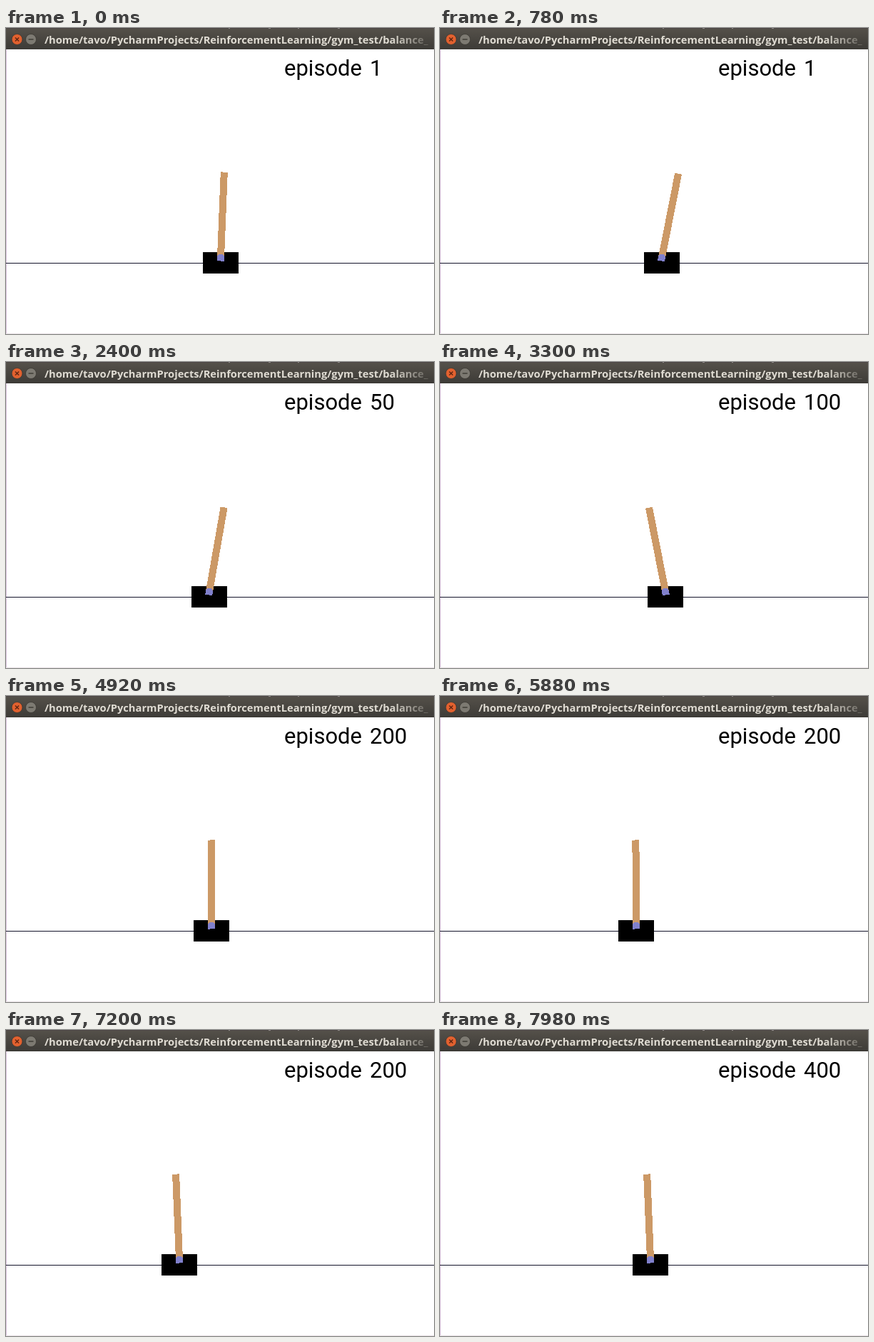
Animation of 600 by 430 pixels, one loop 8 s. Source, as an HTML page:

```html
<!DOCTYPE html>
<html lang="en">
<head>
<meta charset="utf-8">
<title>Pole balancing</title>
<style>
  html, body { margin: 0; width: 100%; height: 100%; overflow: hidden; background: #fff; }
  svg { display: block; width: 600px; height: 430px; }
  .path { font: 700 14.7px "Open Sans", "Noto Sans", sans-serif; fill: #dfdbd2; }
  .episode { font: 400 31px Roboto, "Liberation Sans", sans-serif; fill: #000; }
  .crisp { shape-rendering: crispEdges; }
</style>
</head>
<body>
<svg viewBox="0 0 600 430">
  <defs>
    <linearGradient id="bar" x2="0" y2="1">
      <stop stop-color="#55514a"/>
      <stop offset="1" stop-color="#3d3b37"/>
    </linearGradient>
    <linearGradient id="fade" gradientUnits="userSpaceOnUse" x1="540" x2="598">
      <stop stop-color="#fff"/>
      <stop offset="1" stop-color="#fff" stop-opacity=".1"/>
    </linearGradient>
    <mask id="fadeOut" maskUnits="userSpaceOnUse" x="0" y="0" width="600" height="30">
      <rect width="600" height="30" fill="url(#fade)"/>
    </mask>
  </defs>

  <rect width="600" height="430" fill="#fff"/>
  <rect width="600" height="30" fill="url(#bar)"/>
  <rect width="600" height="1" fill="#4b4545"/>
  <path class="crisp" d="M312 .5H485" stroke="#8d8787" stroke-dasharray="2 54 3 38"/>

  <g stroke="#3a3833" stroke-width=".8">
    <circle cx="15.5" cy="16" r="7.5" fill="#e2612f"/>
    <path d="M13 13.5l5 5m0-5l-5 5" stroke="#5a2412" stroke-width="1.4"/>
    <circle cx="35" cy="16" r="7.5" fill="#7d7a72"/>
    <path d="M31.5 16h7" stroke-width="1.4"/>
  </g>
  <text class="path" x="54" y="22" mask="url(#fadeOut)">/home/tavo/PycharmProjects/ReinforcementLearning/gym_test/balance_</text>

  <g class="crisp">
    <rect y="30" width="1" height="400" fill="#d9c3dc"/>
    <rect y="429" width="600" height="1" fill="#ebe5e9"/>
    <rect y="330" width="600" height="1" fill="#15152b"/>
  </g>

  <text class="episode" y="67"><tspan x="390">episode</tspan><tspan id="count" x="510">1</tspan></text>

  <g id="cart" class="crisp">
    <rect x="-25" y="315" width="50" height="30"/>
    <g transform="translate(0 322.5)">
      <g id="pole">
        <rect x="-5" y="-120" width="10" height="125" fill="#cc9966"/>
        <path d="M-5 5V0A5 5 0 0 1 5 0V5Z" fill="#8080cc"/>
      </g>
    </g>
  </g>
</svg>
<script>
const LOOP = 8000, STEP = 60;

// An untrained cart lunges and the pole topples; a trained one drifts away slowly.
const topple = { cart: u => 1 - (1 - u) ** 3, pole: u => u * u * (3 - 2 * u) };
const drift = { cart: u => u ** 2.3, pole: u => u ** 8 };

// Cart x in px and pole lean in degrees, each from start to end of the episode.
const episodes = [
  { label: 1, start: 0, x: [301, 311], lean: [2.3, 12], style: topple },
  { label: 25, start: 960, x: [302, 283.5], lean: [-1, 13], style: topple },
  { label: 50, start: 1740, x: [301, 285], lean: [0, 12], style: topple },
  { label: 100, start: 2640, x: [298, 316], lean: [1, -11.3], style: topple },
  { label: 200, start: 3360, x: [295, 237], lean: [-0.2, -3.3], style: drift },
  { label: 400, start: 7380, x: [305, 294.2], lean: [0, -3], style: drift }
];

const byId = id => document.getElementById(id);
const count = byId("count"), cart = byId("cart"), pole = byId("pole");
const mix = ([from, to], amount) => from + (to - from) * amount;

function draw(now) {
  const time = Math.floor(now % LOOP / STEP) * STEP;
  const index = episodes.findLastIndex(episode => time >= episode.start);
  const { label, start, x, lean, style } = episodes[index];
  const end = episodes[index + 1]?.start ?? LOOP;
  const u = (time - start) / (end - start);
  count.textContent = label;
  cart.setAttribute("transform", `translate(${Math.round(mix(x, style.cart(u)))} 0)`);
  pole.setAttribute("transform", `rotate(${mix(lean, style.pole(u)).toFixed(3)})`);
}

const startTime = performance.now();
function tick() {
  draw(performance.now() - startTime);
  requestAnimationFrame(tick);
}
tick();
</script>
</body>
</html>
```
